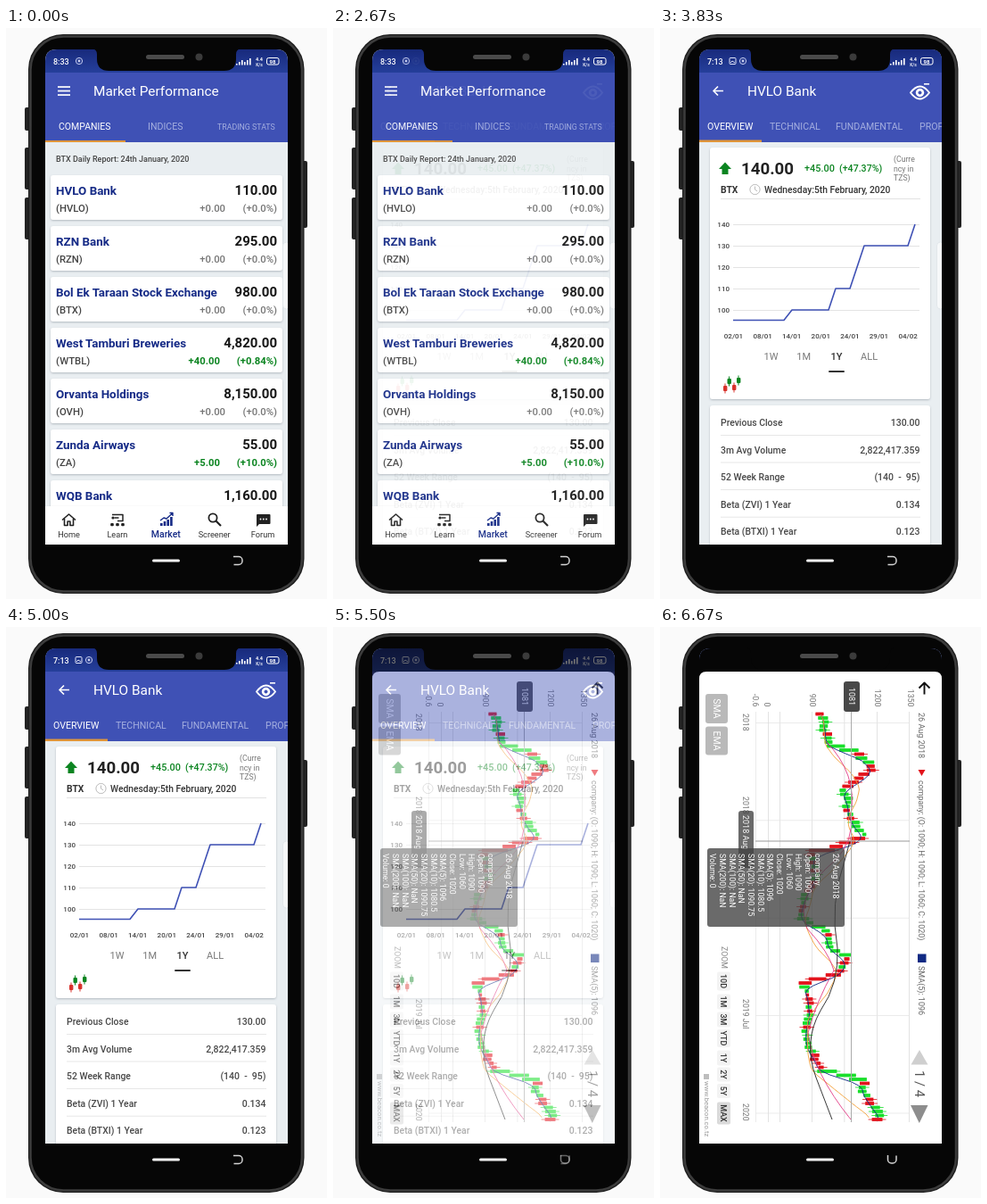
These frames come from a looping animation (360x640 px, 8.49 s). An HTML page:

```html
<!DOCTYPE html>
<html lang="en">
<head>
<meta charset="utf-8">
<title>Market app tour</title>
<style>
html, body { margin: 0; width: 100%; height: 100%; overflow: hidden; background: #fafafa; }
svg { display: block; width: 360px; height: 640px; }
text { font-family: Roboto, "Open Sans", sans-serif; white-space: pre; }
</style>
</head>
<body>
<svg id="stage" viewBox="0 0 360 640" xmlns="http://www.w3.org/2000/svg"></svg>
<script>
const LOOP = 8490;
const BLUE = '#3f51b5', NAVY = '#152a86', GREEN = '#0b8420', TAB = '#a5afe0';

// Drawing helpers, each returning markup
const rect = (x, y, w, h, fill, r = 0, more = '') =>
  `<rect x="${x}" y="${y}" width="${w}" height="${h}" rx="${r}" fill="${fill}" ${more}/>`;
const path = (d, stroke, w = 1, fill = 'none') =>
  `<path d="${d}" stroke="${stroke}" stroke-width="${w}" fill="${fill}" stroke-linejoin="round"/>`;
const fillPath = (d, fill) => `<path d="${d}" fill="${fill}"/>`;
const disc = (x, y, r, fill, stroke = 'none', w = 1) =>
  `<circle cx="${x}" cy="${y}" r="${r}" fill="${fill}" stroke="${stroke}" stroke-width="${w}"/>`;
const text = (x, y, str, size, fill, weight = 400, anchor = 'start', more = '') =>
  `<text x="${x}" y="${y}" font-size="${size}" fill="${fill}" font-weight="${weight}" text-anchor="${anchor}" ${more}>${str}</text>`;
const side = (x, y, str, size, fill, weight = 400, anchor = 'start') =>
  text(x, y, str, size, fill, weight, anchor, `transform="rotate(90 ${x} ${y})"`);
const card = (x, y, w, h) => rect(x, y, w, h, '#fff', 3, 'filter="url(#shade)"');

function statusBar(time, square) {
  const x = square ? 93 : 82;
  let s = rect(44, 24, 272, 27, 'url(#bar)') + text(53, 41, time, 9, '#fff', 500);
  if (square) s += rect(78, 33.5, 7, 7, 'none', 1, 'stroke="#dfe3f7"') + path('M79 39l2-2 3 2', '#dfe3f7');
  s += disc(x, 37, 3.6, 'none', '#c6cdf0') + disc(x, 37, 1.4, '#c6cdf0');
  for (const i of [0, 1, 2, 3, 4, 5])
    s += rect(258 + i * 3, 40 - (i % 3) * 2 - (i > 2 ? 2 : 0), 1.6, 1.5 + (i % 3) * 2 + (i > 2 ? 2 : 0), '#fff');
  s += text(284, 36.5, '4.4', 5.5, '#fff', 700, 'middle') + text(284, 42.5, 'K/s', 5, '#fff', 500, 'middle');
  s += rect(292.5, 33.5, 13.5, 7.5, 'none', 2, 'stroke="#fff"') + text(299, 39.6, '98', 6, '#fff', 700, 'middle');
  return s + rect(44, 50, 272, 78, BLUE);
}

const edgeHandle = () => rect(310.5, 240, 8, 75, '#f7f9fa', 4, 'stroke="#dfe4e7" stroke-width=".8"');

function listScreen() {
  let s = rect(44, 24, 272, 555, '#e9eef1') + statusBar('8:33');
  for (const y of [66, 70.5, 75]) s += rect(58, y - .8, 14, 1.7, '#fff');
  s += text(98, 76, 'Market Performance', 15.4, '#fff');
  s += text(59, 114, 'COMPANIES', 10.5, '#fff') + text(159, 114, 'INDICES', 10.6, TAB) +
       text(237, 114, 'TRADING STATS', 8.8, TAB) + rect(44, 126, 90, 2, '#e0963a');
  s += text(56, 150, 'BTX Daily Report: 24th January, 2020', 9, '#444', 500);
  const rows = [
    ['HVLO Bank', 'HVLO', '110.00'],
    ['RZN Bank', 'RZN', '295.00'],
    ['Bol Ek Taraan Stock Exchange', 'BTX', '980.00'],
    ['West Tamburi Breweries', 'WTBL', '4,820.00', '+40.00', '+0.84%'],
    ['Orvanta Holdings', 'OVH', '8,150.00'],
    ['Zunda Airways', 'ZA', '55.00', '+5.00', '+10.0%'],
    ['WQB Bank', 'WQB', '1,160.00']
  ];
  rows.forEach(([name, code, price, diff, pct], i) => {
    const y = 165 + i * 57, c = diff ? GREEN : '#777', w = diff ? 700 : 500, z = 11.3;
    s += card(50, y, 260, 50) + text(56, y + 22, name, 13.4, NAVY, 700) +
      text(304, y + 22, price, 15, '#161616', 700, 'end') + text(56, y + 41, `(${code})`, z, '#444', 500) +
      text(diff ? 240 : 246, y + 41, diff || '+0.00', z, c, w, 'end') +
      text(304, y + 41, `(${pct || '+0.0%'})`, z, c, w, 'end');
  });
  s += edgeHandle() + rect(44, 536, 272, 46, '#fff', 0, 'filter="url(#shade)"');
  const ink = '#222';
  s += path('M63 551.5l7.5-6.5 7.5 6.5M65.5 550v7.5h3.6v-4.5h2.8v4.5h3.6V550', ink, 1.6);
  s += path('M119 545.5h12v7h-6M121.5 549h5', ink, 1.5) + disc(120, 549, 1.6, ink);
  for (const x of [119, 125, 131]) s += rect(x - 1.8, 555, 3.6, 3.2, ink, 1);
  [3, 5, 7, 10].forEach((h, i) => s += rect(173 + i * 3.7, 558 - h, 2.6, h, NAVY));
  s += path('M173 552l4-3 3 1 6.5-6M183.5 543.5h3.5v3.5', NAVY, 1.4);
  s += disc(232, 549, 4.6, 'none', ink, 1.8) + path('M235.5 552.5l5.5 5.5', ink, 2.2);
  s += fillPath('M282 545h13.5a1 1 0 0 1 1 1v9a1 1 0 0 1-1 1H284l-3 3v-13a1 1 0 0 1 1-1z', ink);
  for (const x of [285.5, 288.8, 292]) s += disc(x, 550.5, .9, '#fff');
  ['Home', 'Learn', 'Market', 'Screener', 'Forum'].forEach((n, i) =>
    s += text(70.5 + i * 54.4, 571, n, i == 2 ? 10.5 : 9.2, i == 2 ? NAVY : '#333', i == 2 ? 500 : 400, 'middle'));
  return s;
}

function detailScreen() {
  let s = rect(44, 24, 272, 555, '#e9eef1') + statusBar('7:13', true);
  s += path('M71 70.5H60M65 65.5l-5 5 5 5', '#fff', 1.7) + text(98, 76, 'HVLO Bank', 15.4, '#fff');
  s += path('M281 72.5q10.5-14 21 0q-10.5 14-21 0z', '#fff', 2) + disc(291.5, 72.5, 4.7, '#fff') +
       disc(291.5, 72.5, 2, BLUE) + rect(296, 62, 6, 1.6, '#fff');
  [[53, 'OVERVIEW', '#fff'], [123, 'TECHNICAL', TAB], [197, 'FUNDAMENTAL', TAB], [291, 'PROFILE', TAB]]
    .forEach(([x, n, c]) => s += text(x, 114, n, 10.6, c));
  s += rect(44, 125.5, 70, 2.5, '#e0963a') + card(56, 134, 247, 282) + card(56, 423, 247, 170);
  s += fillPath('M73 150.5l7 7.5h-3.5v6h-7v-6H66z', GREEN);
  s += text(91, 164, '140.00', 18.7, '#222', 700) + text(162, 161, '+45.00', 10.9, GREEN, 500) +
       text(201, 161, '(+47.37%)', 10.6, GREEN, 500);
  ['(Curre', 'ncy in', 'TZS)'].forEach((n, i) => s += text(262, 150 + i * 10.5, n, 8.7, '#777'));
  s += text(68, 185, 'BTX', 10.3, '#333', 700) + disc(106.5, 181, 5.6, 'none', '#bbb') +
       path('M106.5 177.5v3.7l2.6 1.6', '#bbb') +
       text(117, 185, 'Wednesday:5th February, 2020', 10.3, '#333', 500) + rect(68, 191, 224, 1, '#e2e2e2');
  for (let i = 0; i < 5; i++) {
    const y = 220 + i * 24;
    s += rect(82, y, 209, 1, '#e3e3e3') + text(78, y + 3, 140 - i * 10, 8, '#444', 500, 'end');
  }
  '02/01 08/01 14/01 20/01 24/01 29/01 04/02'.split(' ').forEach((d, i) =>
    s += text(82.5 + i * 32.6, 348, d, 8, '#444', 500, 'middle'));
  s += path('M82 327.5H139L148 316H189L197 292H213L229 244H278L286 220', BLUE, 1.6);
  ['1W', '1M', '1Y', 'ALL'].forEach((n, i) =>
    s += text(124.5 + i * 36.7, 372, n, 11, i == 2 ? '#333' : '#777', i == 2 ? 500 : 400, 'middle'));
  s += rect(189, 384, 18, 2, '#333', 1);
  [[73, 402, '#d8322c'], [77.5, 394, GREEN], [83, 401, '#d8322c'], [88, 393, GREEN]].forEach(([x, y, c]) =>
    s += rect(x - .5, y - 3.5, 1, 11, c) + rect(x - 2, y - 1, 4.4, 6, c, 1));
  [['Previous Close', '130.00'], ['3m Avg Volume', '2,822,417.359'], ['52 Week Range', '(140  -  95)'],
   ['Beta (ZVI) 1 Year', '0.134'], ['Beta (BTXI) 1 Year', '0.123']].forEach(([k, v], i) => {
    const y = 446 + i * 30.6;
    s += text(68, y, k, 10.4, '#484848', 500) + text(291.5, y, v, 10.5, '#484848', 500, 'end');
    if (i < 4) s += rect(68, y + 10, 224, .8, '#e2e2e2');
  });
  return s + edgeHandle();
}

// Price curve as "time,price" in screen units: time runs down, price to the right
const curve = ('96,179 104,187 112,183 120,188 128,186 132,194 136,220 144,226 152,238 157,239 164,228 ' +
  '172,217 179,204 184,204 192,213 200,209 212,215 222,220 230,231 235,225 240,207 246,192 250,170 ' +
  '275,176 300,162 322,157 332,172 338,188 352,187 360,196 367,210 379,205 387,198 392,178 398,158 ' +
  '404,165 430,168 450,163 466,165 480,174 494,180 500,207 506,231 513,224 524,233 534,238 544,249 554,238')
  .split(' ').map(p => p.split(',').map(Number));

function price(t) {
  const i = Math.max(1, curve.findIndex(p => p[0] >= t));
  const [a, b] = [curve[i - 1], curve[i]];
  return a[1] + (b[1] - a[1]) * Math.max(0, (t - a[0]) / (b[0] - a[0]));
}

function average(span) {
  let d = '';
  for (let t = 98; t <= 552; t += 4) {
    let sum = 0, n = 0;
    for (let k = Math.max(96, t - span); k <= t; k += 2) { sum += price(k); n++; }
    d += `${d ? 'L' : 'M'}${(sum / n).toFixed(1)} ${t}`;
  }
  return d;
}

function candles() {
  let s = '', seed = 7;
  const rnd = () => (seed = seed * 16807 % 2147483647) / 2147483647;
  for (let t = 97.5; t < 553; t += 4.5) {
    const a = price(t - 4.5), b = price(t), move = b - a;
    const up = Math.abs(move) > 3.5 ? move > 0 : rnd() > .5;
    const half = Math.abs(move) / 2 + 1.5 + rnd() * 2.5, mid = (a + b) / 2 + (rnd() - .5) * 4;
    const c = up ? '#19df2b' : '#e3131c', wick = half + (rnd() > .6 ? 4 : 0);
    s += rect((mid - wick).toFixed(1), t - .4, (wick * 2).toFixed(1), .8, c) +
         rect((mid - half).toFixed(1), t - 1.9, (half * 2).toFixed(1), 3.8, c);
  }
  return s;
}

function chartScreen() {
  const grey = '#777', dark = 'rgba(66,66,66,.79)';
  let s = rect(44, 24, 272, 555, '#060606') + fillPath('M44 579V58q0-8 8-8H308q8 0 8 8V579z', '#fff');
  s += path('M296.5 75.500V62.500M290.5 68.500l6-6 6 6', '#111', 1.9);
  s += side(290, 96, '26 Aug 2018', 9.1, '#666') + fillPath('M289.5 160h8l-4 7z', '#e3131c') +
       side(290, 172, 'company: (O: 1090; H: 1090; L: 1060; C: 1020)', 8.9, '#666') +
       rect(289, 366.5, 9.5, 9.5, '#102a83') + side(290, 380, 'SMA(5): 1096', 9, '#666');
  for (const x of [134, 170, 206.5, 243, 279]) s += rect(x, 95, .8, 460, '#dcdcdc');
  for (let i = 0; i < 5; i++) s += rect(107, 107 + i * 109.4, 172, .8, '#e6e6e6');
  s += rect(107, 95, .8, 460, '#e6e6e6') + rect(121, 95, .8, 460, '#dcdcdc');
  [[104, '-0.6'], [117, '0'], [167.5, '900'], [240.5, '1200'], [278, '1350']].forEach(([x, n]) =>
    s += side(x, 89.5, n, 8.8, grey, 400, 'end'));
  [[97, '2018'], [190, '2018 Jul'], [417, '2019 Jul'], [534, '2020']].forEach(([y, n]) => s += side(93, y, n, 8.7, grey));
  s += candles();
  s += path(average(14), '#102a83', .9) + path(average(48), '#f3a23c', .9) +
    path('M186 128Q222 165 214 210Q218 240 196 262Q150 300 165 338Q190 365 195 385Q175 420 166 455Q172 500 214 552', '#e23b86', .9) +
    path('M213 240L207 262Q190 310 199 360Q201 400 180 430Q160 465 175 505L193 552', '#222', .9);
  s += rect(214, 95, 1, 460, '#aaa') + rect(107, 239.5, 173, 1, '#999');
  s += rect(206, 61, 18, 34, '#484848', 3) + side(211.7, 78, '1081', 9, '#fff', 400, 'middle');
  s += rect(88, 206, 17, 64, dark, 3) + side(93, 211, '2018 Aug', 9, '#fff');
  s += rect(53, 248, 154, 88, dark, 3) + side(194, 254, '26 Aug 2018', 9, '#fff');
  ['company', 'Open: 1090', 'High: 1090', 'Low: 1060', 'Close: 1020', 'SMA(5): 1096', 'SMA(10): 1080.5',
   'SMA(20): 1090.75', 'SMA(50): NaN', 'SMA(100): NaN', 'SMA(200): NaN', 'Volume: 0'].forEach((n, i) =>
    s += side(173.5 - i * 10.65, 254, n, 8.7, '#fff'));
  s += rect(51, 75, 25, 33, '#b9b9b9', 3) + side(59.7, 91.5, 'SMA', 10.5, '#fff', 400, 'middle') +
       rect(51, 111.5, 25, 32, '#b9b9b9', 3) + side(59.7, 127.5, 'EMA', 10.5, '#fff', 400, 'middle');
  s += side(69, 358, 'ZOOM', 8.8, '#888');
  [['10D', 397, 21], ['1M', 420, 17], ['3M', 440, 17], ['YTD', 461, 20], ['1Y', 483, 17], ['2Y', 501.5, 16],
   ['5Y', 520, 16], ['MAX', 545, 25]].forEach(([n, y, h]) => {
    const on = n == 'MAX';
    s += rect(64, y - h / 2, 15, h, on ? '#dadada' : '#f3f3f3', 2) + side(68.3, y, n, 9, '#333', 500, 'middle');
  });
  s += fillPath('M291 474l9.5 16.5h-19z', '#cfcfcf') + side(286, 512, '1 / 4', 14.8, '#555', 400, 'middle') +
       fillPath('M281 536h19.5l-9.7 20z', '#8d8d8d');
  return s + rect(49, 501, 6, 6, '#bdbdbd') + side(49.5, 509, 'www.beacon.co.tz', 7.6, '#999');
}

function phone() {
  let s = '';
  [[21, 89, 26], [21, 134, 47], [21, 190, 47], [331, 149, 75]].forEach(([x, y, h]) => s += rect(x, y, 7, h, '#222', 2));
  return s + rect(25, 7, 309.5, 627, '#1c1c1c', 39) +
    rect(27.5, 9.5, 304.5, 622, '#060606', 37, 'stroke="#3c3c3c" stroke-width="2.5"');
}

const notch = fillPath('M97 23.5q5 .5 5 6v5q0 13.5 13.5 13.5H244.5q13.5 0 13.5-13.5v-5q0-5.5 5-6z', '#060606') +
  rect(157, 30, 43, 5, '#4a4a4a', 2.5) + disc(216.5, 32.5, 4, '#3b3b3b');

document.getElementById('stage').innerHTML = `
<defs>
  <linearGradient id="bar" x2="0" y2="1">
    <stop offset="0" stop-color="#182a7c"/><stop offset="1" stop-color="#26409c"/>
  </linearGradient>
  <filter id="shade" x="-10%" y="-20%" width="120%" height="150%">
    <feDropShadow dx="0" dy="1" stdDeviation="1.2" flood-color="#56636d" flood-opacity=".38"/>
  </filter>
  <clipPath id="glass"><path d="M44 579V37q0-13 13-13H303q13 0 13 13V579z"/></clipPath>
</defs>
${rect(0, 0, 360, 640, '#fafafa')}${phone()}
<g clip-path="url(#glass)">
  <g>${listScreen()}</g>
  <g id="detail" opacity="0">${detailScreen()}</g>
  <g id="chart" opacity="0">${chartScreen()}</g>
</g>
${notch}${rect(164, 595.5, 31, 3, '#f4f4f4', 1.5)}
<g id="back">${path('M255 592.5h6a4 4 0 0 1 4 4v1a4 4 0 0 1-4 4h-5.5', '#d5d5d5', 1.5)}</g>
<g id="turned" opacity="0">${path('M255.5 592v5a4 4 0 0 0 4 4h1.5a4 4 0 0 0 4-4v-4.5', '#d5d5d5', 1.5)}</g>`;

// Opacity steps: [time in ms, value]
const toDetail = [[0, 0], [2670, .07], [2830, .31], [3000, .56], [3170, .8], [3330, 1], [LOOP, 1]];
const toChart = [[0, 0], [5170, .06], [5330, .3], [5500, .56], [5670, .8], [5830, 1], [LOOP, 1]];

function fade(id, steps) {
  document.getElementById(id).animate(
    steps.map(([t, v]) => ({ offset: t / LOOP, opacity: v, easing: 'steps(1, end)' })),
    { duration: LOOP, iterations: Infinity });
}
fade('detail', toDetail);
fade('chart', toChart);
fade('turned', toChart);
fade('back', toChart.map(([t, v]) => [t, 1 - v]));
</script>
</body>
</html>
```
